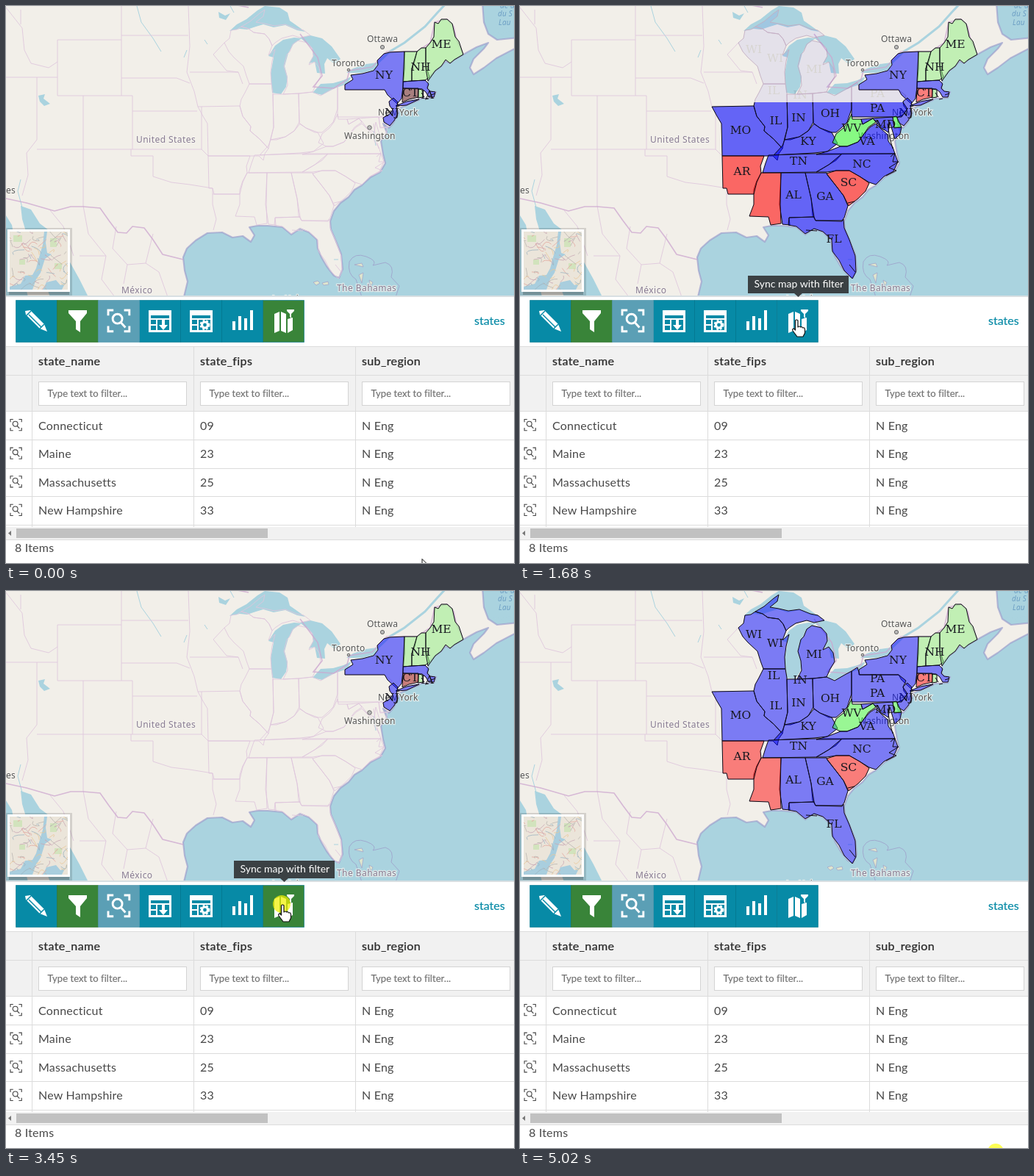
These frames come from a looping animation (691x758 px, 5.19 s). An HTML page:

```html
<!DOCTYPE html>
<html lang="en">
<head>
<meta charset="utf-8">
<title>Sync map with filter</title>
<style>
html, body { margin: 0; width: 100%; height: 100%; overflow: hidden; background: #fff; }
svg { display: block; width: 691px; height: 758px; }
text { font-family: Lato, sans-serif; }
.place text { font: 12px "Noto Sans", sans-serif; letter-spacing: .2px; fill: #555; stroke: #f5f3ee; stroke-width: 2.5px; stroke-opacity: .7; paint-order: stroke; }
.place .country { fill: #887b92; letter-spacing: .45px; }
.place .sea { font-size: 10px; font-style: italic; fill: #6d9fc4; stroke: none; }
.code text, text.code { font: 15.5px "DejaVu Serif", serif; fill: #17171f; text-anchor: middle; }
.zone { fill: #0508ff; fill-opacity: .5; stroke: #0c0c14; stroke-linejoin: round; }
.red { fill: #ff0d0d; }
.lime { fill: #40ff40; }
.pale { fill: #90f080; }
.head { font-size: 16px; font-weight: 500; letter-spacing: .35px; fill: #2e2e2e; stroke: #2e2e2e; stroke-width: .2px; }
.hint { font-size: 13px; fill: #747474; letter-spacing: .05px; stroke: #747474; stroke-width: .2px; }
.cell { font-size: 16px; fill: #484848; letter-spacing: .2px; }

.run { animation: 5.19s step-end infinite; }
#ne { animation-name: ne; }
#low { animation-name: low; }
#up { animation-name: up; }
#ct { animation-name: ct; }
#bits { animation-name: bits; }
#sync { animation-name: sync; }
#tip { animation-name: tip; }
#spot { animation-name: spot; }
#spot2 { animation-name: spot2; }
#cursor { animation-name: move; }
#arrow { animation-name: arrow; }
#hand { animation-name: hand; }
#beam { animation-name: beam; }

@keyframes ne { 0% { opacity: 1 } 50.1% { opacity: 0 } 56.26% { opacity: .35 } 57.8% { opacity: .7 } 59.15%, 100% { opacity: 1 } }
@keyframes low {
  0% { opacity: 0; fill-opacity: .6 }
  29.29% { opacity: .3; fill-opacity: .6 } 30.83% { opacity: .7; fill-opacity: .6 } 32.37% { opacity: 1; fill-opacity: .6 }
  35.26% { opacity: 1; fill-opacity: .5 }
  50.1% { opacity: 0; fill-opacity: .5 }
  80.2% { opacity: .3; fill-opacity: .5 } 81.6% { opacity: .7; fill-opacity: .5 } 83.2%, 100% { opacity: 1; fill-opacity: .5 }
}
@keyframes up {
  0% { opacity: 0 }
  32.37% { opacity: .12 } 33.72% { opacity: .45 } 35.26% { opacity: .8 } 36.8% { opacity: 1 }
  50.1% { opacity: 0 }
  83.2% { opacity: .2 } 84.8% { opacity: .5 } 86.4% { opacity: .8 } 88.05%, 100% { opacity: 1 }
}
@keyframes ct { 0% { fill: #5e0f15 } 23.12% { fill: #a00d10 } 32.37% { fill: #ff0d0d } 50.1% { fill: #9c0b0b } 72.64% { fill: #c60a0a } 83.2%, 100% { fill: #ff0d0d } }
@keyframes bits { 0% { opacity: 1 } 32.37% { opacity: 0 } 56.26% { opacity: 1 } 83.2%, 100% { opacity: 0 } }
@keyframes sync { 0% { fill: #398439 } 11.18% { fill: #28602a } 23.12% { fill: #078aa6 } 50.1% { fill: #398439 } 71.29%, 100% { fill: #078aa6 } }
@keyframes tip { 0% { opacity: 0 } 11.18% { opacity: 1 } 80.2%, 100% { opacity: 0 } }
@keyframes spot { 0% { opacity: 0 } 18.88% { opacity: 1 } 20.23% { opacity: 0 } 42.77% { opacity: 1 } 45.66% { opacity: 0 } 66.47% { opacity: 1 } 68.02%, 100% { opacity: 0 } }
@keyframes spot2 { 0% { opacity: 0 } 96.72%, 100% { opacity: 1 } }
@keyframes move {
  0% { transform: translate(566px, 752px) }
  1.35% { transform: translate(566px, 752px); animation-timing-function: steps(8, start) }
  11.18% { transform: translate(378px, 429px) }
  18.88% { transform: translate(376px, 427px) }
  72.64% { transform: translate(379px, 433px) }
  78.81% { transform: translate(382px, 439px); animation-timing-function: steps(2, end) }
  81.6% { transform: translate(432px, 518px); animation-timing-function: steps(8, end) }
  92.29%, 100% { transform: translate(647px, 763px) }
}
@keyframes arrow { 0% { opacity: 1 } 11.18% { opacity: 0 } 83.2%, 100% { opacity: 1 } }
@keyframes hand { 0% { opacity: 0 } 11.18% { opacity: 1 } 81.6%, 100% { opacity: 0 } }
@keyframes beam { 0% { opacity: 0 } 81.6% { opacity: 1 } 83.2%, 100% { opacity: 0 } }
</style>
</head>
<body>
<svg viewBox="0 0 691 758">
<defs>
  <clipPath id="south"><path d="M0 131H691V400H0Z"/></clipPath>
  <clipPath id="north"><path d="M0 0H691V131H0Z"/></clipPath>
  <clipPath id="frame"><path d="M5 307H84V386H5Z"/></clipPath>
  <g id="east">
    <path d="M306 33L314 32 320 28 330 31 337 36 352 38 358 45 362 54 357 67 366 59 362 75 360 90 361 106 331 106 327 95 323 82 310 70 303 62 297 50 304 44Z"/>
    <path d="M320 28L332 21 345 10 352 5 350 14 340 22 352 24 365 27 380 25 395 31 405 33 414 40 400 43 390 40 375 44 366 50 362 54 358 45 352 38 337 36 330 31Z"/>
    <path d="M390 52L397 47 410 50 417 58 418 68 412 80 420 76 426 84 428 96 422 106 417 117 400 119 377 120 383 108 382 95 378 82 382 66 386 62Z"/>
    <path d="M261 137L318 136 322 150 333 164 332 170 345 181 357 194 352 201 350 210 344 204 275 204 274 160 268 150Z"/>
    <path d="M331 106L361 106 363 118 364 165 360 180 357 194 345 181 332 170 333 164 322 150 318 136 320 127 325 118Z"/>
    <path d="M363 120L377 120 398 119 399 158 392 170 380 178 368 182 360 182 364 165Z"/>
    <path d="M398 119L417 117 428 122 440 115 451 109 451 140 445 158 438 165 430 172 420 172 408 166 399 160Z"/>
    <path d="M451 109L459 104 462 114 515 114 525 122 521 131 527 140 519 151 451 151Z"/>
    <path d="M345 203L357 190 360 182 380 178 392 170 400 160 408 166 424 172 432 187 418 198 400 200Z"/>
    <path d="M338 203L400 201 438 201 430 210 410 222 403 226 330 227 334 214Z"/>
    <path class="lime" d="M425 186L430 174 440 166 446 158 451 147 452 154 464 154 466 161 480 153 484 158 474 165 468 174 460 185 445 191 436 191Z"/>
    <path d="M403 202L418 198 436 191 445 191 460 185 468 174 476 165 484 160 492 168 500 175 501 184 507 192 510 201Z"/>
    <path d="M464 154L507 151 509 165 519 165 517 174 510 181 506 168 503 158 501 172 490 165 484 157 480 153 466 161Z"/>
    <path class="lime" d="M507 151L512 150 519 165 509 166Z"/>
    <path d="M438 201L510 201 514 212 508 225 495 232 484 243 475 240 462 232 448 224 430 224 417 226 403 226 420 216Z"/>
    <path class="red" d="M417 228L430 224 448 224 462 232 475 241 470 252 460 262 447 272 440 258 430 245Z"/>
    <path d="M388 227H417L418 230 430 245 440 258 446 272 441 288 438 292 402 292 398 285 396 262Z"/>
    <path d="M355 227H388L396 262 400 287 366 288 367 298 357 297 353 270Z"/>
    <path class="red" d="M328 227H355L354 270 355 296 341 298 338 287 312 286 318 270 318 250 322 238Z"/>
    <path class="red" d="M275 204H332L327 218 328 227 322 240 318 256H283L281 248H276Z"/>
    <path d="M366 288L400 287 402 292 438 293 440 290 441 302 448 318 456 340 457 362 452 371 441 360 434 346 425 334 424 318 412 307 400 303 388 310 376 300 365 298Z"/>
    <path d="M500 160L503 180 507 194M504 205L510 200 507 212 515 212 502 220 512 224 498 231M446 268L455 266M389 305L404 306M448 352L456 362" fill="none"/>
  </g>
  <g id="north-east">
    <path d="M461 114V107L472 100 469 94 485 92 500 88 506 80 505 74 514 65 522 63 542 62 542 85 540 110 538 126 532 133 519 121 515 114Z"/>
    <path d="M530 136L545 130 562 127 545 135Z"/>
    <path class="pale" d="M542 62H559L556 75 552 85V102L540 103Z"/>
    <path class="pale" d="M559 62L565 57 571 57V80L576 97 570 101 552 102V85Z"/>
    <path class="pale" d="M571 57L577 50 582 42 583 22 588 24 592 18 600 18 607 24 611 42 616 48 622 66 610 73 604 78 598 73 592 82 584 88 574 102 571 85Z"/>
    <path d="M540 103L552 102 570 101 575 106 573 112 577 116 584 117 582 124 575 124 571 117 566 113 540 112Z"/>
    <path class="pale" d="M561 113L567 114V124L560 125Z"/>
    <path d="M521 130L527 125 533 131 531 140 533 146 528 156 522 163 514 158 513 152 522 147 526 141 522 136Z"/>
    <path d="M565 118L569 124M570 127L575 126M578 121L584 119" fill="none"/>
  </g>
  <g id="target" fill="none">
    <path d="M0 4V0H4M12 0H16V4M16 12V16H12M4 16H0V12"/>
    <circle cx="7" cy="6.500" r="3.600"/><path d="M9.500 9.200L13 13"/>
  </g>
</defs>

<!-- base map -->
<path fill="#aad3df" d="M0 0H691V396H0Z"/>
<path fill="#f2efe9" stroke="#9b9bcb" stroke-opacity=".65" stroke-width="2.200" stroke-linejoin="round" d="M-5-5H648L650 22 656 38 668 46 696 43V56L667 71 650 84 636 93 631 84 636 72 650 58 656 50 640 56 622 66 610 73 604 78 598 75 592 82 584 88 575 98 573 111 577 116 585 117 582 125 566 126 548 129 562 128 535 139 533 148 527 159 521 166 513 160 518 172 510 184 513 202 516 214 509 226 496 233 484 244 474 250 466 260 455 268 446 279 441 293 442 304 448 318 456 338 458 358 453 370 446 367 436 354 429 342 424 330 423 318 412 308 400 303 388 311 376 301 356 299 342 299 331 301 338 312 333 321 322 313 308 315 294 308 274 309 258 319 246 330 241 342 243 360 247 375 241 400H-5Z"/>
<path fill="#aad3df" d="M20 272L34 277 46 296 62 308 80 336 100 372 112 396H60L40 340 28 310 22 290ZM0 285L8 298 14 330 30 396H0ZM660 35L674 37 689 33 676 41Z"/>
<path fill="#aad3df" d="M304 34L314 25 327 18 342 6 352 0 372 2 383 9 386 20 396 27 407 35 396 33 380 26 364 29 350 25 340 28 328 32 318 31ZM362 118L360 92 364 70 357 68 366 54 377 46 392 43 402 44 391 52 384 64 379 82 383 97 381 110 374 120ZM400 43L414 40 430 44 443 55 455 72 447 79 437 71 433 79 434 92 423 91 420 76 412 78 418 68 416 57ZM417 118L428 106 445 105 459 101 470 96 464 106 447 112 430 121ZM463 91L472 85 490 79 505 77 502 87 484 91ZM44 122L53 120 51 126 60 133 52 136 46 130ZM289 8L298 13 305 10 299 19 290 16Z"/>
<path fill="none" stroke="#aad3df" stroke-width="3" d="M503 80L522 62 542 50 570 28 586 10 600-5"/>
<path fill="none" stroke="#aad3df" d="M178 0L184 22 200 44 211 62M20 236L16 252 22 274M500 170L503 190M305 0L310 9M246 60L242 70M270 46L274 52M446 345H452"/>
<g fill="none" stroke="#dfc6dc" stroke-opacity=".85">
  <path d="M157 0V122M157 40H248M157 98H232L250 105M70 46H157M70 46V122H172V195M42 97H70M42 97V182L28 200M0 97H42M105 122V272M42 195H266M172 143H260M248 0L250 55 246 90 256 116 261 137M250 90H316L322 106M170 195V204H200V232L225 240 250 243 281 248V270L286 290 282 305M281 256H318M28 200L30 230 22 258M0 2L22 30 25 60 34 78 58 84 70 76M297 50L282 66 300 88 316 90M266 137V195L275 204M20 5V25"/>
  <path d="M105 272L112 310 136 340 130 372 148 396M60 278L78 300 92 340M150 300L145 330 165 352 160 378M200 310L190 350 208 362 220 396M165 352L190 350M100 340L136 340"/>
  <g fill-opacity="0"><use href="#east"/><use href="#north-east"/></g>
</g>
<path fill="none" stroke="#cda6cf" stroke-width="1.600" stroke-opacity=".75" d="M0 262L28 268 66 279 88 273 105 273 128 275 140 292 152 308 164 309 172 300 188 302 200 318 213 338 241 345M300-4L330 2M400 38L424 70 430 95 418 110 446 112 464 100 467 88 498 83 518 62 559 62 577 50 583 22 600 18 609 28 613 46 622 66"/>
<path fill="none" stroke="#9d9bc9" stroke-opacity=".75" d="M467 348Q474 335 490 341T499 353L516 349Q529 353 524 369L535 381 530 396M467 348Q464 365 476 372L484 396"/>
<path fill="#dfe6ce" stroke="#a0a0c8" stroke-width=".7" d="M474 352L484 350 486 355ZM480 366L486 363 484 377ZM494 373L499 376 496 382ZM418 376l6-2 3 3-5 3ZM430 377l8-2 1 4-7 1Z"/>
<g class="place">
  <g fill="#bbb" stroke="#666"><circle cx="512" cy="56" r="2.600"/><circle cx="494.500" cy="165.500" r="2.800"/><circle cx="533" cy="135.500" r="1.800"/><circle cx="466" cy="87" r="1.800"/></g>
  <text x="491" y="49">Ottawa</text>
  <text x="443" y="82">Toronto</text>
  <text x="506" y="149">New York</text>
  <text x="460" y="181">Washington</text>
  <text x="0" y="255">es</text>
  <text class="country" x="177" y="186">United States</text>
  <text class="country" x="157" y="391">México</text>
  <text class="country" x="450" y="388">The Bahamas</text>
  <text x="362" y="403">La Habana</text>
  <text class="sea" x="672" y="3">de d</text>
  <text class="sea" x="669" y="14">du S</text>
  <text class="sea" x="670" y="26">Lau</text>
</g>

<!-- state layers -->
<g id="ne" class="run zone">
  <use href="#north-east"/>
  <path id="ct" class="run" d="M540 112H561V124L548 127 539 131Z"/>
  <g class="code" fill-opacity="1" stroke="none">
    <text x="514" y="99">NY</text><text x="592" y="57">ME</text><text x="564" y="88">NH</text>
    <text x="550" y="123">CT</text><text x="525" y="150">NJ</text>
    <text id="bits" class="run" x="573" y="126">IA</text>
  </g>
</g>
<g id="low" class="run zone">
  <use href="#east" clip-path="url(#south)"/>
  <g class="code" fill-opacity="1" stroke="none" id="south-codes"></g>
</g>
<g id="up" class="run zone">
  <use href="#east" clip-path="url(#north)"/>
  <g class="code" fill-opacity="1" stroke="none" id="north-codes"></g>
</g>

<!-- basemap switcher -->
<path fill="#000" opacity=".13" d="M0 302H90V395H0Z"/>
<path fill="#000" opacity=".22" d="M4 386H86V393H4Z"/>
<path fill="#fff" d="M2 304H87V389H2Z"/>
<g clip-path="url(#frame)">
  <path fill="#ebe5da" d="M5 307H84V386H5Z"/>
  <path fill="#d2e3bd" d="M10 312h12v9h-12ZM60 316h9v12h-9ZM66 350h10v8h-10ZM18 345h8v7h-8Z"/>
  <path fill="#a9cede" d="M52 307L50 325 45 342 41 357 36 366 26 367 20 378 5 382V386H36L41 372 47 363 53 344 62 338 56 336 54 322 56 307ZM50 386L55 376 68 373 74 380 80 378 76 386Z"/>
  <g id="roads" fill="none" stroke-width=".8"></g>
</g>

<!-- attribute panel -->
<path fill="#fff" d="M0 395H691V758H0Z"/>
<path fill="#d8dfe2" d="M0 394H691V396H0Z"/>
<g stroke="#067890" stroke-opacity=".65">
  <path fill="#078aa6" d="M13.500 400.500H69.500V457.500H13.500ZM181.500 400.500H237.500V457.500H181.500ZM237.500 400.500H293.500V457.500H237.500ZM293.500 400.500H349.500V457.500H293.500Z"/>
  <path fill="#398439" stroke="#2f722f" d="M69.500 400.500H125.500V457.500H69.500Z"/>
  <path fill="#5b9fb5" stroke="#4f95ac" d="M125.500 400.500H181.500V457.500H125.500Z"/>
  <path id="sync" class="run" d="M349.500 400.500H405.500V457.500H349.500Z"/>
</g>
<g fill="#fff">
  <path d="M26 415L33 414 52 433 56 443 46 439 27 420Z"/>
  <path fill="none" stroke="#078aa6" stroke-width="1.500" d="M31 420L48 437M28 421L34 415M46 439L52 433"/>
  <path d="M85 414H110V418L101 429V444L95 440V429L85 418Z"/>
  <g stroke="#fff" stroke-width="1.600" transform="translate(139 414) scale(1.800)"><use href="#target"/></g>
  <path d="M194 414H225V444H194ZM250 414H281V444H250Z"/>
  <path fill="#078aa6" d="M197 421h25v4h-25ZM197 427h7v6h-7ZM197 435h7v6h-7ZM206 427h16v14h-16ZM253 421h25v4h-25ZM253 427h7v6h-7ZM253 435h7v6h-7ZM262 427h16v14h-16Z"/>
  <path d="M212 426h4v8h4l-6 7-6-7h4Z"/>
  <circle cx="270.500" cy="434" r="5.500" stroke="#fff" stroke-width="3" stroke-dasharray="2.500 2"/>
  <circle cx="270.500" cy="434" r="2.400" fill="#078aa6"/>
  <path d="M308 429h4v12h-4ZM316 422h4v19h-4ZM324 425h4v16h-4ZM332 414h4v27h-4Z"/>
  <path d="M365 419L372 416V442L365 445ZM374 416L381 419V445L374 442ZM383 426L390 424V441L383 445ZM382 413H392V415L388 419V425L386 423V419L382 415Z"/>
</g>
<text x="637" y="434" font-size="16" fill="#078aa6" stroke="#078aa6" stroke-width=".2">states</text>
<path fill="#f1f1f1" d="M0 463H691V551H0ZM0 709H691V726H0Z"/>
<path fill="none" stroke="#dcdcdc" d="M0 463.500H691M0 502.500H691M0 551.500H691M0 590.500H691M0 629.500H691M0 667.500H691M0 706.500H691M0 726.500H691M35.500 463V709M255.500 463V709M475.500 463V709"/>
<path fill="#c1c1c1" d="M14 711H356V724H14Z"/>
<path fill="#777" d="M7 714V721L3 717.500Z"/>
<g id="table"></g>
<text class="cell" x="12" y="743">8 Items</text>

<g id="tip" class="run">
  <path fill="#35393b" fill-opacity=".95" d="M310 367H447V391H384L378.500 396 373 391H310Z"/>
  <text x="318.500" y="383" font-size="14" fill="#fff">Sync map with filter</text>
</g>
<circle id="spot" class="run" cx="375" cy="426" r="12" fill="#f0f000" fill-opacity=".72"/>
<circle id="spot2" class="run" cx="647" cy="763" r="11" fill="#ff5"/>
<g id="cursor" class="run" stroke="#111" stroke-linejoin="round">
  <path id="arrow" class="run" fill="#fff" d="M0 .5V16L4 12.500 6.500 18 9 17 6.500 11.500H11Z"/>
  <path id="hand" class="run" fill="#fff" stroke-width="1.200" d="M-1.500 1Q0-1 2 1V10Q4 8 5.500 10Q7.500 9 8.500 11Q11 10 11.500 13V18L9 23H1L-5 15Q-6 12-3.500 12L-1.500 14Z"/>
  <path id="beam" class="run" fill="none" stroke="#999" d="M-3 0H3M0 0V15M-3 15H3"/>
</g>
</svg>
<script>
const $ = id => document.getElementById(id);
const text = (s, x, y, cls) => `<text x="${x}" y="${y}"${cls ? ` class="${cls}"` : ''}>${s}</text>`;

// state codes: name, centre x, baseline
const codes = list => list.split(' ').map(c => text(...c.split(','))).join('');
$('south-codes').innerHTML = codes('MO,300,174 IL,348,161 IN,379,157 OH,422,151 PA,486,144 KY,392,189 TN,379,216 WV,451,171 VA,472,189 MD,497,166 NC,465,220 SC,447,245 AR,302,230 AL,372,262 GA,415,264 FL,427,322');
$('north-codes').innerHTML = codes('WI,318,64 WI,347,76 MI,400,91 IL,345,120 IN,381,126 PA,486,124');

// table: three columns, four rows
const columns = [
  [44, 'state_name', 'Connecticut', 'Maine', 'Massachusetts', 'New Hampshire'],
  [264, 'state_fips', '09', '23', '25', '33'],
  [484, 'sub_region', 'N Eng', 'N Eng', 'N Eng', 'N Eng']
];
const rowY = i => 576.5 + i * 38.6;
$('table').innerHTML = columns.map(([x, title, ...cells]) =>
  text(title, x, 489, 'head') +
  `<rect x="${x + .5}" y="511.5" width="201" height="32" fill="#fff" stroke="#d4d4d4"/>` +
  text('Type text to filter...', x + 12.5, 532, 'hint') +
  cells.map((c, i) => text(c, x, rowY(i), 'cell')).join('')
).join('') + [0, 1, 2, 3].map(i =>
  `<g stroke="#444" stroke-width="1.2" transform="translate(6 ${rowY(i) - 14}) scale(.95)"><use href="#target"/></g>`
).join('');

// street web of the small map
let seed = 7;
const rnd = n => (seed = seed * 16807 % 2147483647) / 2147483647 * n;
const tints = ['#e3a9a0', '#e9c89a', '#b9b5b0', '#c9a9b5', '#9eb4c0'];
$('roads').innerHTML = Array.from({ length: 75 }, (_, i) =>
  `<path stroke="${tints[i % 5]}" d="M${rnd(80) + 4} ${rnd(80) + 306}q${rnd(16) - 8} ${rnd(16) - 8} ${rnd(30) - 15} ${rnd(24) - 12}"/>`
).join('');
</script>
</body>
</html>
```
